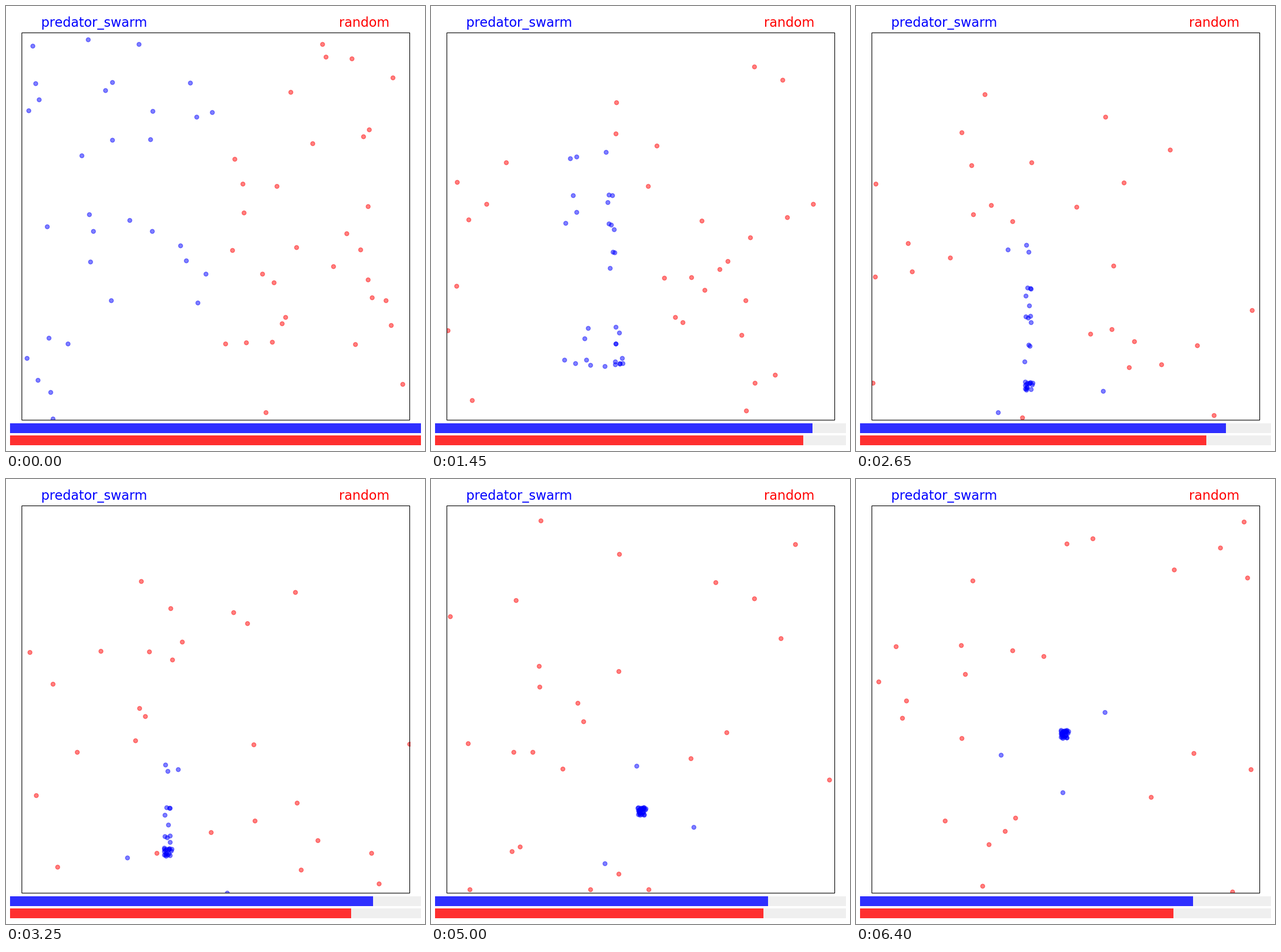
Recreate the animation shown at these times as a matplotlib script. Size 726 by 771 pixels, loop 6450 ms.

```python
import numpy as np
import matplotlib.pyplot as plt
from matplotlib.animation import FuncAnimation
from matplotlib.patches import Rectangle

W, H, DPI = 726, 771, 100
FRAMES, STEP_MS = 129, 50
X0, X1, Y0, Y1 = 27.5, 699.5, 46.5, 717.5
ORIGIN, SPAN = np.array([X0, Y0]), np.array([X1 - X0, Y1 - Y0])
COUNT = 32
SPEED = SPAN[0] / 100  # top speed per axis, px per step
BAR_X, BAR_W = 7, 712
rng = np.random.default_rng(11)

# key points: step, swarm centre x and y, energy of each team
STEP, CX, CY, BLUE, RED = np.transpose([
    (0, 330, 575, 1.000, 1.000),
    (16, 335, 578, 0.941, 0.940),
    (42, 316, 669, 0.897, 0.853),
    (65, 280, 646, 0.883, 0.830),
    (86, 396, 627, 0.861, 0.813),
    (113, 336, 528, 0.763, 0.786),
    (128, 361, 442, 0.810, 0.763)])


def key(values, t):
    return np.interp(t, STEP, values)


def centre(t):
    return np.array([key(CX, t), key(CY, t)])


def scatter_in(left, right):
    """Random starts in a vertical strip given as shares of the field."""
    share = rng.uniform((left, 0), (right, 1), (COUNT, 2))
    return ORIGIN + share * SPAN


def fly_swarm():
    """Hunters steer to the moving centre, each axis limited to SPEED."""
    pos = scatter_in(0, 0.5)
    track = [pos]
    offset = rng.uniform(-7, 7, pos.shape)
    strays = np.arange(3)
    for t in range(1, FRAMES):
        c = centre(t)
        lag = np.interp(t, (16, 42), (1, 0))
        goal = c + offset
        goal[:, 0] -= 0.10 * lag * np.maximum(c[1] - pos[:, 1], 0)
        goal[:, 1] -= 0.25 * lag * np.maximum(c[0] - pos[:, 0], 0)
        # a few overshoot and loop around the rest
        angle = t / 22 + 2 * strays
        reach = (1 - lag) * (75 + 25 * strays)
        goal[strays, 0] += reach * np.cos(angle)
        goal[strays, 1] += reach * np.sin(angle)
        pos = pos + np.clip(goal - pos, -SPEED, SPEED)
        track.append(pos)
    return np.array(track)


def fly_random():
    """Random thrust on a wrapping field; energy sets how many survive."""
    pos = scatter_in(0.5, 1)
    vel = rng.uniform(-SPEED, SPEED, pos.shape) * 0.8
    track = [pos]
    for t in range(1, FRAMES):
        vel = np.clip(vel + rng.normal(0, 0.6, vel.shape), -SPEED, SPEED)
        pos = ORIGIN + (pos + vel - ORIGIN) % SPAN
        while len(pos) > np.ceil(COUNT * key(RED, t)):
            prey = np.argmin(np.hypot(*(pos - centre(t)).T))
            pos, vel = np.delete(pos, prey, 0), np.delete(vel, prey, 0)
        track.append(pos)
    return track


swarm, loose = fly_swarm(), fly_random()

plt.rcParams["font.family"] = "DejaVu Sans"
fig = plt.figure(figsize=((W + 0.01) / DPI, (H + 0.01) / DPI), dpi=DPI,
                 facecolor="white")

page = fig.add_axes([0, 0, 1, 1])
page.set(xlim=(0, W), ylim=(H, 0))
page.axis("off")

arena = fig.add_axes([X0 / W, 1 - Y1 / H, SPAN[0] / W, SPAN[1] / H])
arena.set(xlim=(X0, X1), ylim=(Y1, Y0))
arena.axis("off")


def px(n):
    return n * 72 / DPI


def label(x, text, color):
    page.text(x, 36, text, color=color, size=px(22.67), ha="center",
              va="baseline")


def bar(y, color):
    for shade in ("#efefef", color):
        patch = page.add_patch(Rectangle((BAR_X, y), BAR_W, 17, fc=shade,
                                         lw=0))
    return patch


def dots(color):
    return arena.scatter([], [], s=px(7.2) ** 2, c=color, alpha=0.5,
                         linewidths=px(1.2), edgecolors=color)


label(152.5, "predator_swarm", "blue")
label(620.5, "random", "red")
blue_bar, red_bar = bar(723, "#2f2fff"), bar(744, "#ff2f2f")
red_dots, blue_dots = dots("red"), dots("blue")
arena.add_patch(Rectangle(ORIGIN, *SPAN, fill=False, ec="black", lw=px(1.1),
                          snap=False, clip_on=False, zorder=3))


def draw(t):
    blue_dots.set_offsets(swarm[t])
    red_dots.set_offsets(loose[t])
    blue_bar.set_width(BAR_W * key(BLUE, t))
    red_bar.set_width(BAR_W * key(RED, t))
    return blue_dots, red_dots, blue_bar, red_bar


anim = FuncAnimation(fig, draw, frames=FRAMES, interval=STEP_MS,
                     repeat=True, repeat_delay=0, blit=False)
plt.show()
```
